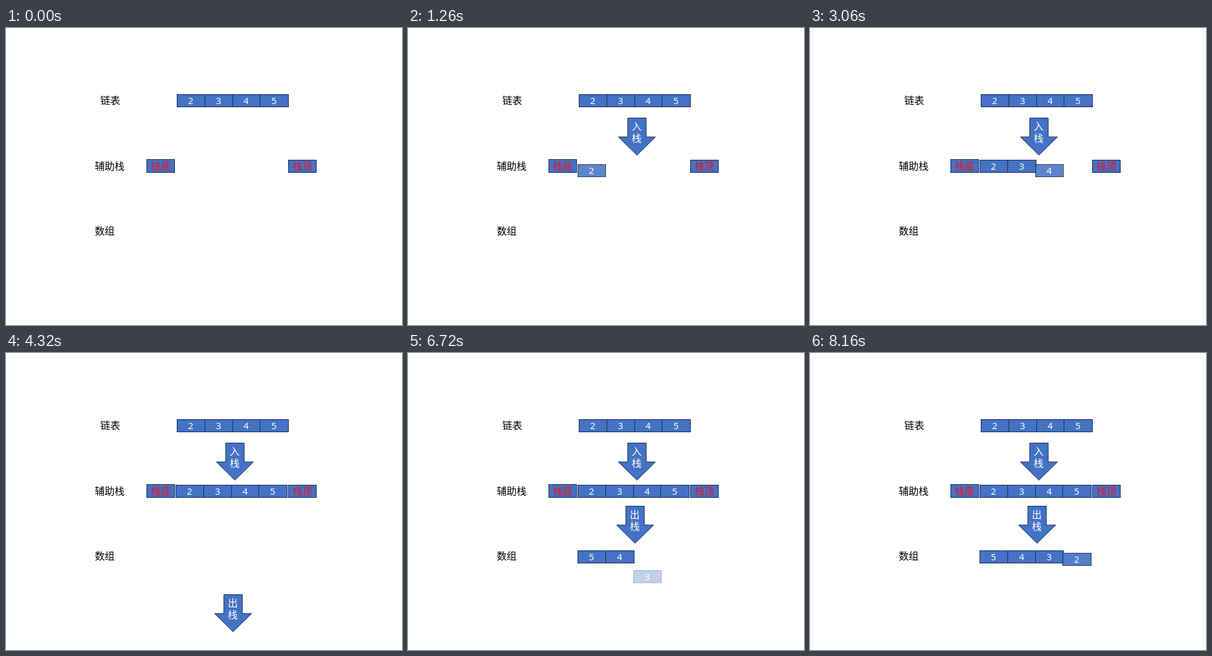
Recreate the animation shown at these times as an HTML page with a canvas. Size 640x480 px, loop 8220 ms.

```html
<!DOCTYPE html>
<html lang="zh-CN">
<head>
<meta charset="utf-8">
<title>链表 → 辅助栈 → 数组</title>
<style>
  html, body { margin: 0; width: 100%; height: 100%; overflow: hidden; background: #fff; }
  canvas { display: block; width: 640px; height: 480px; }
</style>
</head>
<body>
<canvas id="stage" width="640" height="480"></canvas>
<script>
const ctx = document.getElementById('stage').getContext('2d');

const FILL = '#4472c4', LINE = '#172c51', RED = '#f0101c';
const CJK = '16px "Noto Sans CJK SC", "Noto Sans CJK", sans-serif';
const DIGIT = '15px "Noto Sans", "Open Sans", sans-serif';

// All timings below are counted in ticks of 60 ms.
const TICK = 60, LOOP = 8220;
const FLY = 7.5, FLOAT = 15;

const LIST_X = [276.5, 321.5, 366.5, 410.5, 456.5];
const ROW_X = [274.5, 319.5, 364.5, 408.5];
const ROW_W = [45, 46, 45, 46];

const arrows = [
  { start: 0.5, x: 370, y: 145.5, text: '入栈' },
  { start: 69.1, x: 367, y: 247.5, text: '出栈' }
];
const rows = [
  { y: 213.5, digits: '2345', starts: [8.1, 23.1, 38.1, 53.2] },
  { y: 319.5, digits: '5432', starts: [76.2, 91.2, 107, 122.2] }
];

function progress(tick, start, length) {
  const p = Math.min(1, Math.max(0, (tick - start) / length));
  return p > 0.99 ? 1 : p;
}

function write(text, x, y, color, font, align = 'center') {
  ctx.font = font;
  ctx.fillStyle = color;
  ctx.textAlign = align;
  ctx.fillText(text, x, y);
}

function box(x, y, w, h, alpha = 1) {
  ctx.globalAlpha = alpha;
  ctx.fillStyle = FILL;
  ctx.fillRect(x + 0.5, y + 0.5, w - 1, h - 1);
  ctx.strokeStyle = LINE;
  ctx.strokeRect(x, y, w, h);
  ctx.globalAlpha = 1;
}

function digitBox(digit, x, y, w, alpha) {
  box(x, y, w, 20, alpha);
  write(digit, x + w / 2 - 0.5, y + 15, '#fff', DIGIT);
}

function arrow(x, y, text) {
  ctx.beginPath();
  ctx.moveTo(x - 15, y);
  for (const [dx, dy] of [[15, 0], [15, 30.5], [30, 30.5], [0, 60], [-30, 30.5], [-15, 30.5]]) {
    ctx.lineTo(x + dx, y + dy);
  }
  ctx.closePath();
  ctx.fillStyle = FILL;
  ctx.fill();
  ctx.strokeStyle = LINE;
  ctx.stroke();
  write(text[0], x - 0.5, y + 19.5, '#fff', CJK);
  write(text[1], x - 0.5, y + 38, '#fff', CJK);
}

function drawFixed() {
  write('链表', 152.5, 123, '#000', CJK, 'left');
  write('辅助栈', 143.5, 229, '#000', CJK, 'left');
  write('数组', 143.5, 334, '#000', CJK, 'left');
  for (let i = 0; i < 4; i++) {
    digitBox('2345'[i], LIST_X[i], 107.5, LIST_X[i + 1] - LIST_X[i], 1);
  }
  box(227.5, 212.5, 45, 21);
  write('栈底', 250, 229, RED, CJK);
  box(456.5, 213.5, 45, 20);
  write('栈顶', 479, 229, RED, CJK);
}

function draw(ms) {
  const tick = Math.floor((ms % LOOP) / TICK);
  ctx.fillStyle = '#fff';
  ctx.fillRect(0, 0, 640, 480);
  ctx.lineWidth = 1;
  drawFixed();

  // Arrows fly in from below the stage.
  for (const a of arrows) {
    const p = progress(tick, a.start, FLY);
    if (p > 0) arrow(a.x, a.y + Math.round((1 - p) * (480 - a.y)), a.text);
  }

  // Boxes rise by a tenth of the stage while fading in.
  for (const r of rows) {
    r.starts.forEach((start, i) => {
      const p = progress(tick, start, FLOAT);
      if (p > 0.07) digitBox(r.digits[i], ROW_X[i], r.y + Math.round((1 - p) * 48), ROW_W[i], p);
    });
  }
}

const begin = performance.now();
function loop() {
  draw(performance.now() - begin);
  requestAnimationFrame(loop);
}
loop();
</script>
</body>
</html>
```
